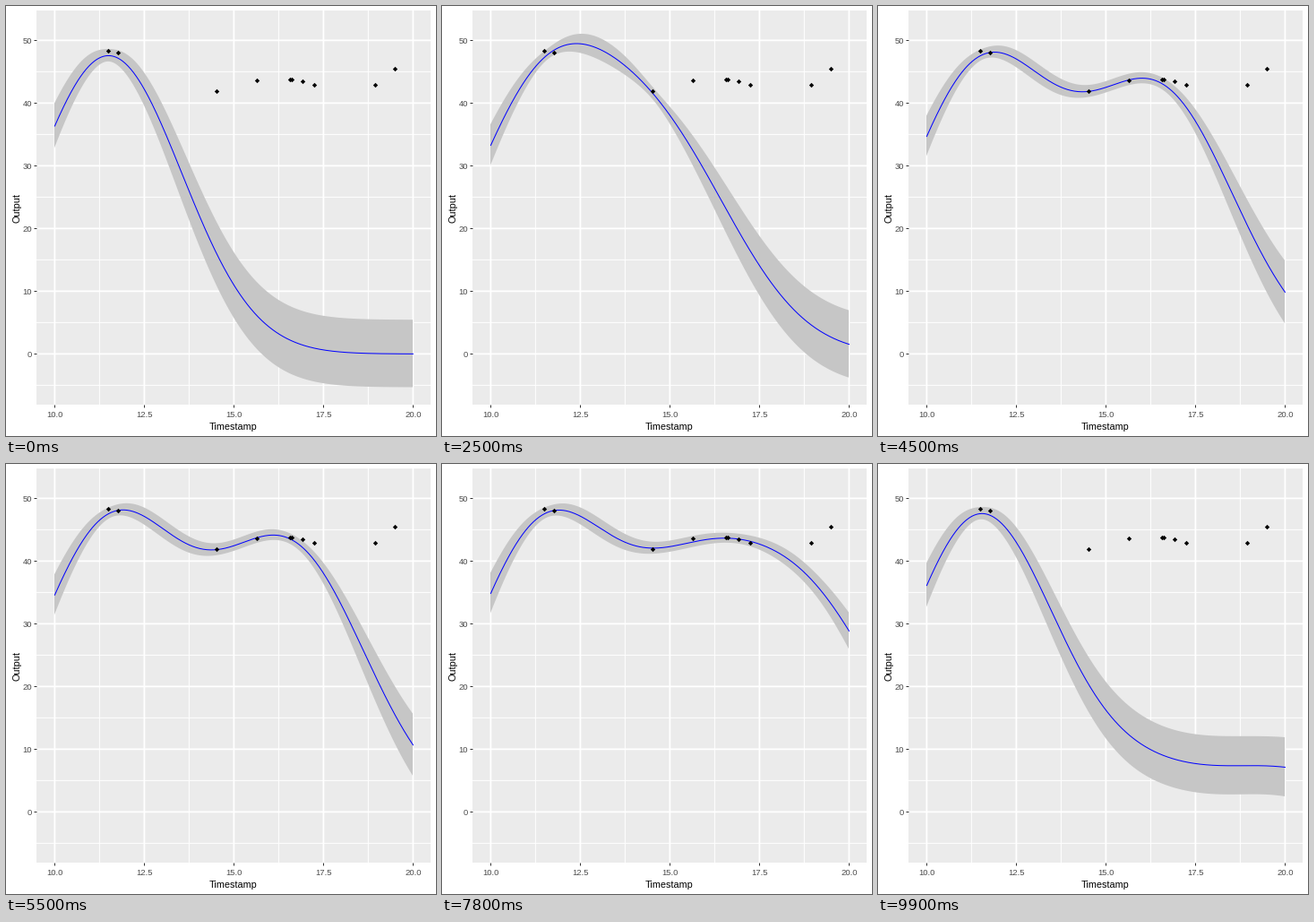
Recreate the animation shown at these times as a matplotlib script. Size 480 by 480 pixels, loop 10000 ms.

```python
import numpy as np
import matplotlib.pyplot as plt
from matplotlib.animation import FuncAnimation
from matplotlib.patches import Polygon
from matplotlib.transforms import Affine2D

SIZE = 480
DPI = 100
PX = 72 / DPI  # one pixel in points
PER_STATE = 10

# Gaussian process: squared-exponential kernel, noise relative to signal
SCALE = 8.36
NOISE = 0.0175
PRIOR_BAND = 5.38

obs_x = np.array([11.5, 11.76, 14.52, 15.63, 16.56, 16.62, 16.92, 17.25, 18.95, 19.49])
obs_y = np.array([48.4, 48.0, 41.97, 43.6, 43.77, 43.8, 43.47, 42.92, 42.95, 45.55])
grid_x = np.linspace(10, 20, 401)


def kernel(a, b):
    return np.exp(-(a[:, None] - b[None, :]) ** 2 / SCALE)


def posterior(n):
    """Mean and half band width after the first n observations."""
    x, y = obs_x[:n], obs_y[:n]
    cov = kernel(x, x) + NOISE * np.eye(n)
    cross = kernel(grid_x, x)
    weights = np.linalg.solve(cov, cross.T)
    mean = weights.T @ y
    var = 1 + NOISE - np.sum(cross.T * weights, axis=0)
    return np.array([mean, PRIOR_BAND * np.sqrt(var / (1 + NOISE))])


states = [posterior(n) for n in range(1, len(obs_x) + 1)]
FRAMES = PER_STATE * len(states)


def blend(frame):
    """Hold each state, then move linearly to the next one."""
    i, step = divmod(frame, PER_STATE)
    last_held = 3 if i == 0 else 4
    t = max(0, step - last_held) / (PER_STATE - last_held)
    return (1 - t) * states[i] + t * states[(i + 1) % len(states)]


plt.rcParams["font.family"] = "Liberation Sans"
fig = plt.figure(figsize=(SIZE / DPI, SIZE / DPI), dpi=DPI, facecolor="white")
ax = fig.add_axes([34 / SIZE, 35 / SIZE, 440 / SIZE, 440 / SIZE], facecolor="#EBEBEB")
# 40 px per x unit, 7 px per y unit
ax.set_xlim(9.49, 9.49 + 440 / 40)
ax.set_ylim(-8.086, -8.086 + 440 / 7)
for spine in ax.spines.values():
    spine.set_visible(False)

ax.set_xticks(np.arange(10, 20.1, 2.5), ["10.0", "12.5", "15.0", "17.5", "20.0"])
ax.set_yticks(range(0, 51, 10))
ax.set_xticks(np.arange(11.25, 20, 2.5), minor=True)
ax.set_yticks(range(-5, 50, 10), minor=True)
ax.set_axisbelow(True)
ax.grid(which="major", color="white", lw=1.8 * PX, snap=False)
ax.grid(which="minor", color="white", lw=PX, snap=False)
ax.tick_params(which="major", length=3 * PX, width=PX, color="#333333",
               labelcolor="#4D4D4D", labelsize=9.5 * PX)
ax.tick_params(which="minor", length=0)
ax.tick_params(axis="x", pad=4 * PX)
ax.tick_params(axis="y", pad=2 * PX)

title = dict(fontsize=10.9 * PX, color="black", ha="center", va="baseline")
fig.text(253.5 / SIZE, 1 - 473 / SIZE, "Timestamp", **title)
fig.text(15.5 / SIZE, 1 - 225 / SIZE, "Output", rotation=90,
         rotation_mode="anchor", **title)

# Strokes run through pixel centres, the fill along pixel edges
band = Polygon([(10, 0), (20, 0), (20, 1)], closed=True, fc="#C6C6C6", ec="none",
               zorder=1)
ax.add_patch(band)
band.set_transform(ax.transData + Affine2D().translate(-0.4, 0.5))
curve, = ax.plot([], [], color="blue", lw=PX, zorder=2)
ax.scatter(obs_x, obs_y, s=(3.8 * PX) ** 2, marker="D", color="black",
           linewidths=0, zorder=3)


def update(frame):
    mean, half = blend(frame)
    upper = np.column_stack([grid_x, mean + half])
    lower = np.column_stack([grid_x, mean - half])
    band.set_xy(np.vstack([upper, lower[::-1]]))
    curve.set_data(grid_x, mean)
    return band, curve


anim = FuncAnimation(fig, update, frames=FRAMES, interval=100, repeat=True,
                     repeat_delay=0)
plt.show()
```
